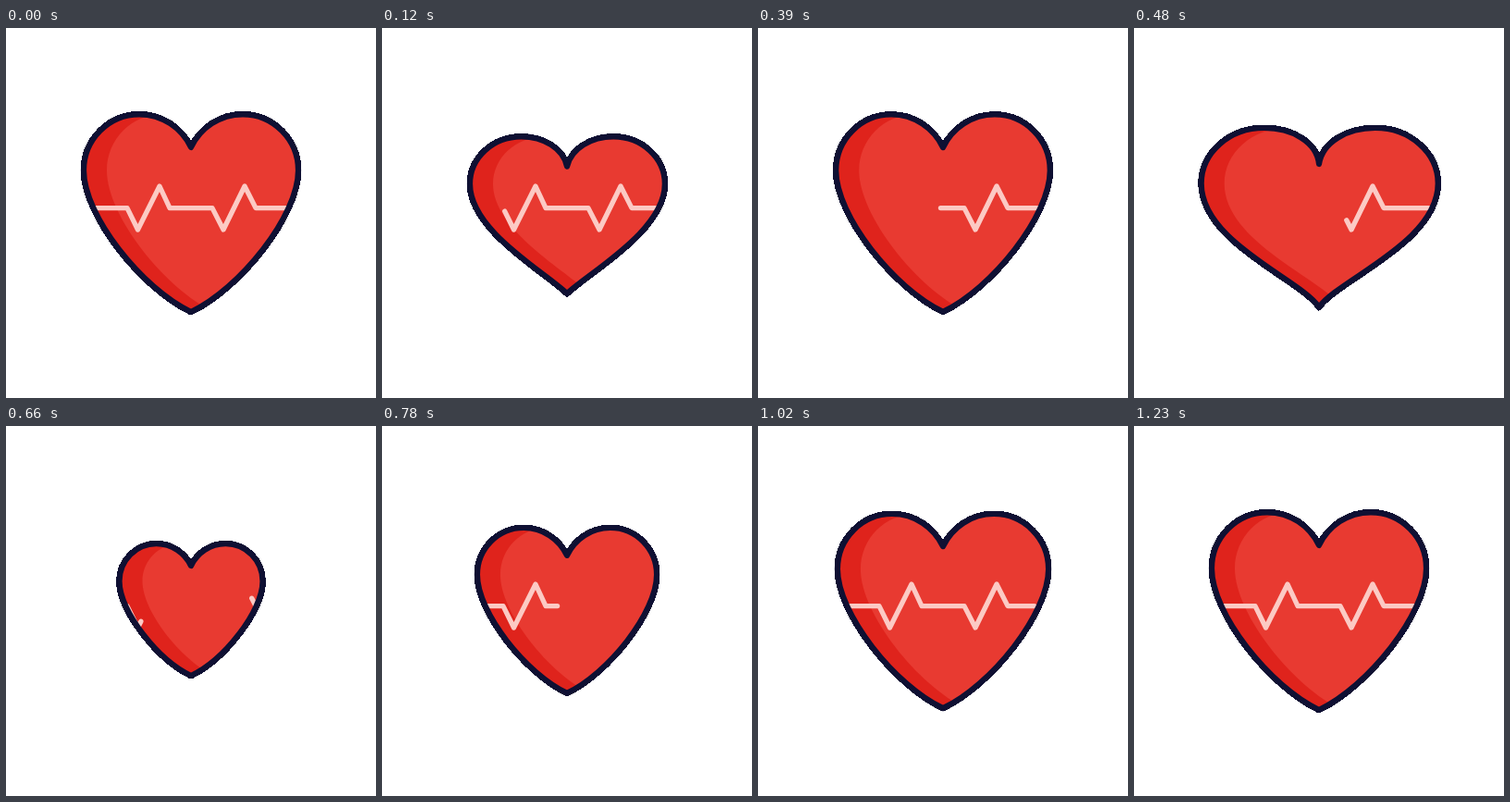
These frames come from a looping animation (400 px wide and 400 px high, 2710 ms). An HTML page:

```html
<!DOCTYPE html>
<html lang="en">
<head>
<meta charset="utf-8">
<title>Heartbeat</title>
<style>
  html, body { margin: 0; width: 100%; height: 100%; overflow: hidden; background: #fff; }
  svg { display: block; width: 100%; height: 100%; }
</style>
</head>
<body>
<svg viewBox="0 0 400 400">
  <defs>
    <clipPath id="inside"><path id="clip"/></clipPath>
  </defs>
  <!-- Hard outer edge under the smooth outline -->
  <path id="rim" fill="none" stroke="#0f1033" stroke-width="6.8" stroke-linejoin="round" shape-rendering="crispEdges"/>
  <g clip-path="url(#inside)">
    <rect width="400" height="400" fill="#df231c"/>
    <path id="light" fill="#e83a31"/>
    <g fill="none" stroke="#fccac4" stroke-width="5.3" stroke-linecap="round" stroke-linejoin="round">
      <path id="oldPulse"/>
      <path id="newPulse"/>
    </g>
  </g>
  <path id="outline" fill="none" stroke="#0f1033" stroke-width="6.2" stroke-linejoin="round"/>
</svg>
<script>
const LOOP = 2710, STEP = 30;
const SHADE = 25, PIVOT = 195.5, SMALL = 0.632;
const $ = id => document.getElementById(id);

// Half a heart as [distance from the axis, y], from notch to tip.
const REST = [[0, 129], [10, 108], [31, 93.3], [56, 93.3], [89, 93.3], [116, 120.5],
              [116, 154], [116, 203], [53, 282], [0, 307]];
const WIDE = [[0, 147], [3, 123], [30, 108], [60, 108], [98, 108], [128, 135],
              [128, 168], [128, 232], [20, 272], [0, 302]];

const PULSE = 'M81 194.6H131L142.5 218L166 171L177 194.6H223L235 218L258 171L270 194.6H319';
const oldPulse = $('oldPulse'), newPulse = $('newPulse');
for (const p of [oldPulse, newPulse]) p.setAttribute('d', PULSE);
const length = oldPulse.getTotalLength();
for (const p of [oldPulse, newPulse]) p.setAttribute('stroke-dasharray', `${length} ${length + 20}`);

const sine = p => (1 - Math.cos(Math.PI * p)) / 2;
const cubicOut = p => 1 - (1 - p) ** 3;

// Pose: amount of the wide shape and size of the resting shape.
const POSES = [
  { at: 0,    wide: 0, rest: 1 },
  { at: 60,   wide: 1, rest: 0, ease: sine },
  { at: 195,  wide: 0, rest: SMALL, ease: sine },
  { at: 400,  wide: 0, rest: 1, ease: sine },
  { at: 480,  wide: 1, rest: 0, ease: sine },
  { at: 640,  wide: 0, rest: SMALL, ease: sine },
  { at: 1230, wide: 0, rest: 1, ease: cubicOut }
];

function poseAt(t) {
  const i = POSES.findIndex(p => p.at > t);
  if (i < 0) return POSES[0];
  const a = POSES[i - 1], b = POSES[i];
  const k = b.ease((t - a.at) / (b.at - a.at));
  return { wide: a.wide + (b.wide - a.wide) * k, rest: a.rest + (b.rest - a.rest) * k };
}

function halfHeart({ wide, rest }) {
  return REST.map(([x, y], i) => [
    x * rest + WIDE[i][0] * wide,
    PIVOT + (y - PIVOT) * rest + (WIDE[i][1] - PIVOT) * wide
  ]);
}

const join = points => points.map(p => p.map(n => n.toFixed(2)).join(' ')).join(' ');

function draw(t) {
  const pose = poseAt(t);
  const half = halfHeart(pose);
  const side = dir => half.map(([x, y]) => [200 + dir * x + (x ? 0.7 * pose.wide : 0), y]);
  const left = side(-1), right = side(1).reverse();

  const heart = `M${join(left.slice(0, 1))}C${join(left.slice(1))}C${join(right.slice(1))}Z`;
  for (const id of ['rim', 'clip', 'outline']) $(id).setAttribute('d', heart);

  const edge = left.slice(3).map(([x, y]) => [x + SHADE, y]);
  $('light').setAttribute('d',
    `M${join(edge.slice(0, 1))}C${join(edge.slice(1))}H400V0H${edge[0][0].toFixed(2)}Z`);

  const erased = t < 1230 ? 0.449 * t : length;
  oldPulse.setAttribute('stroke-dashoffset', -erased);
  oldPulse.style.display = erased < length ? '' : 'none';

  const drawn = Math.min(length, 0.697 * (t - 540));
  newPulse.setAttribute('stroke-dashoffset', length - drawn);
  newPulse.style.display = drawn > 0 ? '' : 'none';
}

const start = performance.now();
function tick() {
  const t = (performance.now() - start) % LOOP;
  draw(Math.floor(t / STEP) * STEP);
  requestAnimationFrame(tick);
}
tick();
</script>
</body>
</html>
```
